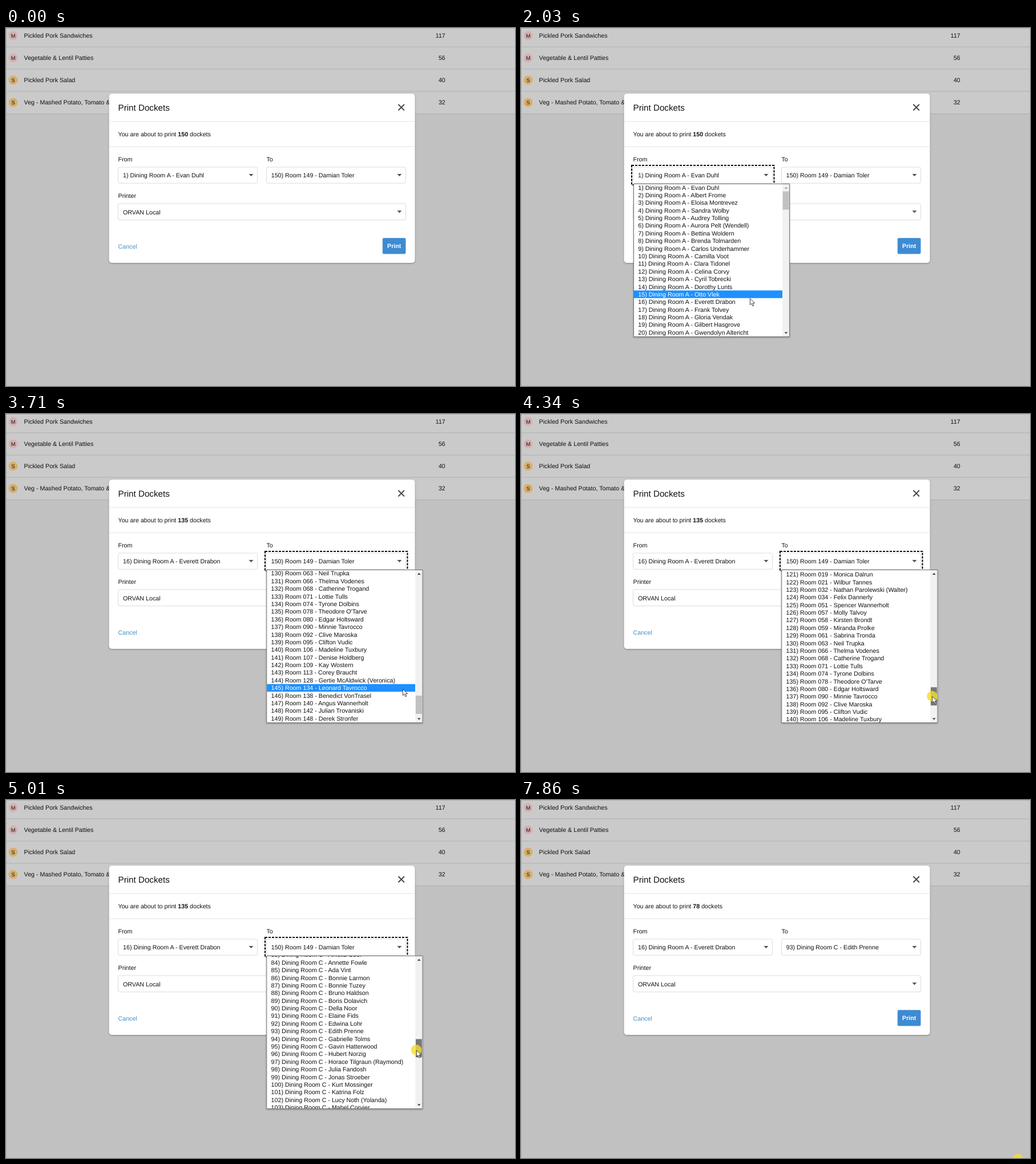
An HTML page for the animation above (8 s loop, 892 by 628 pixels).

```html
<!DOCTYPE html>
<html lang="en">
<head>
<meta charset="utf-8">
<title>Print Dockets</title>
<style>
html, body { margin: 0; width: 100%; height: 100%; overflow: hidden; background: #c1c1c1; }
svg { display: block; width: 100%; height: 100%; }
text { font: 10.7px "Liberation Sans", Arial, sans-serif; fill: #111; text-rendering: geometricPrecision; white-space: pre; }
.bold { font-weight: bold; }
.field { fill: #fff; stroke: #dcdcdc; }
.arrow { fill: #555; }
.focus { fill: none; stroke: #000; stroke-width: 2; stroke-dasharray: 4 2; }
</style>
</head>
<body>
<svg viewBox="0 0 892 628" xmlns="http://www.w3.org/2000/svg">
  <defs>
    <filter id="shadow" x="-5%" y="-5%" width="110%" height="112%">
      <feDropShadow dx="0" dy="1" stdDeviation="1.6" flood-opacity=".35"/>
    </filter>
    <clipPath id="listClip"><rect x="0" y="274" width="261" height="267"/></clipPath>
    <path id="caret" class="arrow" d="M-4-2H4L0 2.2Z"/>
  </defs>

  <rect width="892" height="628" fill="#c1c1c1"/>
  <rect width="892" height="150" fill="#cacaca"/>
  <g id="meals"></g>
  <path d="M0 .5H892M0 33H892M0 72H892M0 111H892M0 150.5H892M.5 0V628" stroke="#b0b0b0" fill="none"/>

  <rect x="180.7" y="115" width="535.8" height="297" rx="5" fill="#fff" filter="url(#shadow)"/>
  <path d="M181 164H716.5M181 208H716.5" stroke="#e2e2e2"/>
  <text x="196.5" y="145.2" style="font-size:15.2px">Print Dockets</text>
  <path d="M687.5 134L698 144.5M698 134L687.5 144.5" stroke="#444" stroke-width="1.8"/>
  <text x="196.5" y="189.8">You are about to print <tspan id="count" class="bold"></tspan> dockets</text>

  <text x="196.5" y="233.7">From</text>
  <text x="456.5" y="233.7">To</text>
  <text x="196.5" y="298">Printer</text>
  <rect class="field" x="196.5" y="244" width="244" height="28.3" rx="2.5"/>
  <rect class="field" x="456.5" y="244" width="244" height="28.3" rx="2.5"/>
  <rect class="field" x="196.5" y="308" width="504" height="28.7" rx="2.5"/>
  <use href="#caret" x="429.5" y="258"/>
  <use href="#caret" x="689.5" y="258"/>
  <use href="#caret" x="689.5" y="322.2"/>
  <text id="fromValue" x="205" y="262.2"></text>
  <text id="toValue" x="464.7" y="262.2"></text>
  <text x="205" y="326.6">ORVAN Local</text>
  <text x="196.5" y="386.5" style="fill:#418fc6">Cancel</text>
  <rect x="660" y="368.5" width="40.4" height="27.7" rx="2" fill="#3d8bd2" stroke="#79b0e2" stroke-width=".6"/>
  <text class="bold" x="680.2" y="386" text-anchor="middle" style="fill:#fff">Print</text>

  <rect id="fromFocus" class="focus" x="194" y="241" width="249.5" height="34.3"/>
  <rect id="toFocus" class="focus" x="454" y="241" width="249.5" height="34.3"/>
  <g id="lists"></g>

  <circle id="press" r="9.3" fill="#f5de28" fill-opacity=".8"/>
  <path id="cursor" d="M.4.4V11.6L3 9.2 5 13.7 6.9 12.9 5 8.6H8.6Z" fill="#fff" stroke="#333" stroke-width=".9"/>
</svg>

<script>
const LOOP = 8000, ROW = 13.385, TOP = 273, COUNT = 150;
const $ = id => document.getElementById(id);

function add(parent, tag, attrs, content = '') {
  const node = document.createElementNS('http://www.w3.org/2000/svg', tag);
  for (const key in attrs) node.setAttribute(key, attrs[key]);
  node.textContent = content;
  return parent.appendChild(node);
}
const show = (node, on) => node.setAttribute('visibility', on ? 'visible' : 'hidden');
const move = (node, x, y) => node.setAttribute('transform', `translate(${x} ${y})`);

// Background menu
[['M', 'Pickled Pork Sandwiches', 117], ['M', 'Vegetable & Lentil Patties', 56],
 ['S', 'Pickled Pork Salad', 40], ['S', 'Veg - Mashed Potato, Tomato &', 32]].forEach(([kind, name, amount], i) => {
  const y = 13.3 + i * 39.1, g = $('meals');
  add(g, 'circle', { cx: 12.5, cy: y, r: 7.9, fill: kind === 'M' ? '#d5b0b1' : '#d9ae6c' });
  add(g, 'text', { x: 12.5, y: y + 3.3, 'text-anchor': 'middle', style: 'font-size:9.3px' }, kind);
  add(g, 'text', { x: 31.6, y: y + 3.8 }, name);
  add(g, 'text', { x: 769.8, y: y + 3.8, 'text-anchor': 'end' }, amount);
});

// Residents, by docket number
const labels = {};
function enrol(first, place, names) {
  names.split(',').forEach((name, i) => labels[first + i] = `${first + i}) ${place} ${name}`);
}
enrol(1, 'Dining Room A -', 'Evan Duhl,Albert Frome,Eloisa Montrevez,Sandra Wolby,Audrey Tolling,Aurora Pelt (Wendell),Bettina Woldern,Brenda Tolmarden,Carlos Underhammer,Camilla Voot,Clara Tidonel,Celina Corvy,Cyril Tobrecki,Dorothy Lunts,Otto Vlek,Everett Drabon,Frank Tolvey,Gloria Vendak,Gilbert Hasgrove,Gwendolyn Altericht');
enrol(83, 'Dining Room C -', 'Amelia Ober,Annette Fowle,Ada Vint,Bonnie Larmon,Bonnie Tuzey,Bruno Haldson,Boris Dolavich,Della Noor,Elaine Fids,Edwina Lohr,Edith Prenne,Gabrielle Tolms,Gavin Hatterwood,Hubert Norzig,Horace Tilgraun (Raymond),Julia Fandosh,Jonas Stroeber,Kurt Mossinger,Katrina Folz,Lucy Noth (Yolanda),Mabel Corvier,Marvin Tolbeck,Miriam Eldway,Nadine Foss,Norman Quell,Olive Tarrow,Percy Wendle,Rosalie Hemp,Simon Drey,Sonia Calder,Sylvia Morhanka,Tim Drawblin,Troy Farnadine');
enrol(116, 'Room', '001 - Paul Vartmin,003 - Penelope Durgos,005 - Glenn Trosk,007 - Jasper Undovicz,016 - Rupert Siller,019 - Monica Dalrun,021 - Wilbur Tannes,032 - Nathan Parolewski (Walter),034 - Felix Dannerly,051 - Spencer Wannerholt,057 - Molly Talvoy,058 - Kirsten Brondt,059 - Miranda Prolke,061 - Sabrina Tronda,063 - Neil Trupka,066 - Thelma Vodenes,068 - Catherine Trogand,071 - Lottie Tulls,074 - Tyrone Dolbins,078 - Theodore O\'Tarve,080 - Edgar Holtsward,090 - Minnie Tavrocco,092 - Clive Maroska,095 - Clifton Vudic,106 - Madeline Tuxbury,107 - Denise Holdberg,109 - Kay Wostern,113 - Corey Braucht,128 - Gertie McAldwick (Veronica),134 - Leonard Tavrocco,138 - Benedict VonTrasel,140 - Angus Wannerholt,142 - Julian Trovaniski,148 - Derek Stronfer,149 - Damian Toler');

function makeList(left, first, last, selected) {
  const root = add($('lists'), 'g', { transform: `translate(${left} 0)` });
  add(root, 'rect', { x: .5, y: 273.5, width: 273, height: 268, fill: '#fff', stroke: '#777', filter: 'url(#shadow)' });
  const view = add(root, 'g', { 'clip-path': 'url(#listClip)' });
  const rows = add(view, 'g', {});
  const bar = add(rows, 'rect', { x: 1, width: 260, height: ROW, fill: '#1e90ff' });
  const items = {};
  for (let n = first; n <= last; n++)
    items[n] = add(rows, 'text', { x: 8.3, y: 283.5 + (n - 1) * ROW }, labels[n]);
  add(root, 'rect', { x: 261, y: 274, width: 12, height: 267, fill: '#f1f1f1' });
  const up = add(root, 'path', { d: 'M264.5 282H270.5L267.5 278.8Z' });
  add(root, 'path', { d: 'M264.5 533.4H270.5L267.5 536.6Z', fill: '#404040' });
  const thumb = add(root, 'rect', { x: 261.7, width: 10.8, height: 32 });

  return (open, scroll, x, y, dragging) => {
    show(root, open);
    const inside = y > TOP && x < left + 261;
    const hover = inside ? Math.floor((y - TOP + scroll) / ROW) + 1 : selected;
    move(rows, 0, -scroll);
    bar.setAttribute('y', TOP + (hover - 1) * ROW);
    for (const n in items) items[n].style.fill = n == hover ? '#fff' : '';
    up.setAttribute('fill', scroll ? '#404040' : '#a3a3a3');
    thumb.setAttribute('y', 286.6 + 209 * scroll / ((COUNT - 20) * ROW));
    thumb.setAttribute('fill', dragging ? '#787878' : '#c1c1c1');
  };
}
const drawFrom = makeList(197, 1, 20, 1);
const drawTo = makeList(456.3, 83, 150, 150);

// Keys are [time, x, y, easing into this key]
const smooth = p => p * p * (3 - 2 * p);
const easeOut = p => 1 - (1 - p) ** 1.5;
const pointerKeys = [
  [190, 821, 604], [940, 396, 266, easeOut],
  [1150, 396, 266], [1750, 399, 391], [2030, 401, 474], [2170, 402, 482],
  [2370, 402, 482], [3030, 558, 258, smooth],
  [3240, 558, 258], [3710, 695, 482, smooth], [3950, 721, 510],
  [4100, 721, 510], [4550, 720, 482], [5010, 719, 438.5],
  [5140, 719, 438.5], [5610, 625, 398, smooth],
  [6950, 625, 398], [7750, 871, 630, smooth]
];
const scrollKeys = [[4100, 129 * ROW], [4550, 1498.7], [5010, 1105.7], [5080, 1107]];
const presses = [[1010, 1210], [2170, 2370], [3170, 3370], [3990, 5140], [5870, 6070], [7860, LOOP]];

function sample(keys, t) {
  const next = keys.findIndex(key => key[0] > t);
  if (next <= 0) return keys.at(next).slice(1);
  const a = keys[next - 1], b = keys[next];
  const p = (t - a[0]) / (b[0] - a[0]), k = typeof b[3] === 'function' ? b[3](p) : p;
  return [1, 2].map(i => a[i] + (b[i] - a[i]) * k);
}
const during = (t, start, end) => t >= start && t < end;

function draw(t) {
  const [x, y] = sample(pointerKeys, t);
  const [hoverX, hoverY] = sample(pointerKeys, t - 30);
  const from = t < 2370 ? 1 : 16, to = t < 6070 ? 150 : 93;
  $('count').textContent = to - from + 1;
  $('fromValue').textContent = labels[from];
  $('toValue').textContent = labels[to];
  show($('fromFocus'), during(t, 1010, 3170));
  show($('toFocus'), during(t, 3170, 7860));
  drawFrom(during(t, 1010, 2370), 0, hoverX, hoverY, false);
  drawTo(during(t, 3170, 6070), sample(scrollKeys, t)[0], hoverX, hoverY, during(t, 3990, 5140));
  show($('press'), presses.some(([start, end]) => during(t, start, end)));
  show($('cursor'), t >= 190);
  move($('press'), x, y);
  move($('cursor'), x, y);
}

function tick() {
  draw(performance.now() % LOOP);
  requestAnimationFrame(tick);
}
tick();
</script>
</body>
</html>
```
